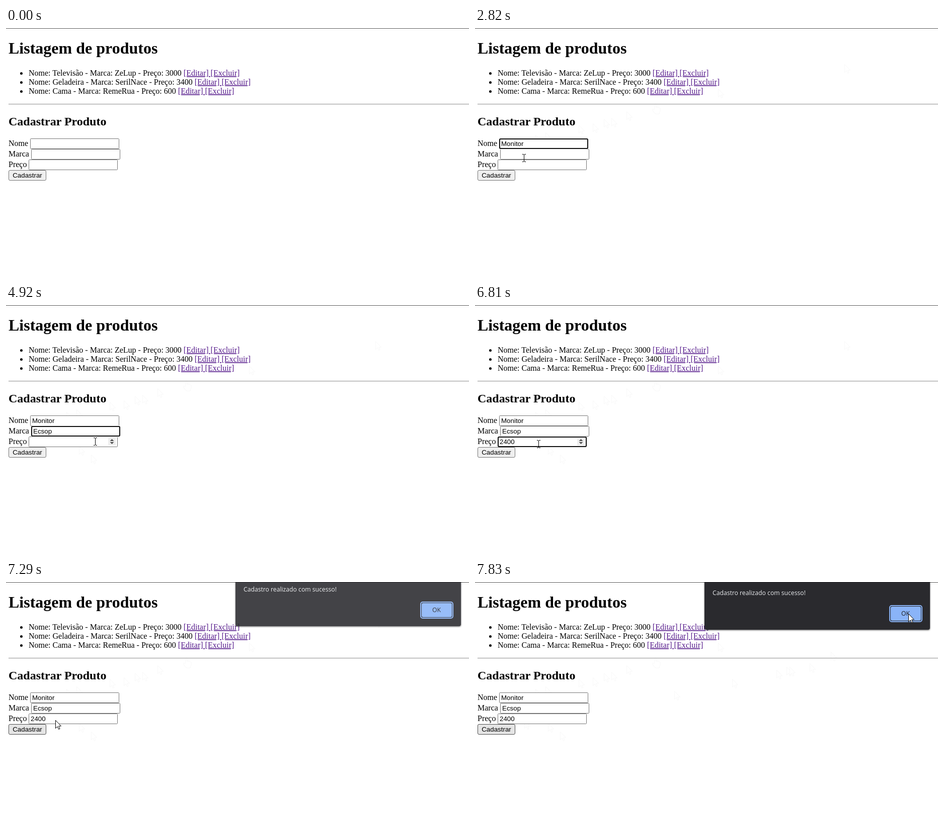
Recreate the animation shown at these times as an HTML page. Size 920 px wide and 496 px high, loop 8000 ms.

```html
<!DOCTYPE html>
<html lang="pt">
<head>
<meta charset="utf-8">
<title>Listagem de produtos</title>
<style>
  html, body { margin: 0; width: 100%; height: 100%; overflow: hidden; background: #fff; }
  svg { display: block; font: 16px "Liberation Serif", serif; }
  .bold { font-weight: bold; }
  .link { fill: #551a8b; text-decoration: underline; }
  .ui { font: 13.333px "Liberation Sans", sans-serif; }
  .dialog { font: 12.2px "Open Sans", sans-serif; }
  .box { fill: #fff; stroke: #767676; }
  .halo { fill: none; stroke: #fff; }
  .ring { fill: none; stroke: #101010; stroke-width: 2; }
  #button rect { fill: #efefef; stroke: #767676; }
  #button.hover rect { fill: #e5e5e5; stroke: #4f4f4f; }
  #trail { opacity: .03; }
</style>
</head>
<body>
<svg width="920" height="496" viewBox="0 0 920 496">
  <defs>
    <path id="arrow" d="M.5 .5V16.5L4.2 13L6.6 18.4L9 17.4L6.7 12H11.5Z" fill="#fff" stroke="#000"/>
    <path id="beam" d="M-3 -7.5H-1L.5 -6.5L2 -7.5H4M.5 -6.5V6.5M-3 7.5H-1L.5 6.5L2 7.5H4" fill="none" stroke="#000"/>
    <path id="hand" d="M5.5 12V2Q7 -.5 8.5 2V8Q10 6 11.5 8Q13 7 14.5 9Q16 8 17 10V15L15 21H7L1 13Q2 10 5.5 13" fill="#fff" stroke="#000"/>
    <filter id="shadow" x="-5%" y="-20%" width="110%" height="150%">
      <feDropShadow dx="0" dy="1" stdDeviation="1.8" flood-opacity=".65"/>
    </filter>
  </defs>
  <rect width="920" height="1" fill="#555"/>
  <g id="trail"></g>
  <text class="bold" x="5" y="51" font-size="32">Listagem de produtos</text>
  <g id="list"></g>
  <rect x="5" y="151" width="915" height="1" fill="#9a9a9a"/>
  <rect x="5" y="152" width="915" height="1" fill="#eee"/>
  <text class="bold" x="5" y="194" font-size="24">Cadastrar Produto</text>
  <g id="form"></g>
  <g id="rings"></g>
  <g id="spinner">
    <rect x="203" y="265" width="15" height="15" fill="#efefef"/>
    <path d="M206.500 271L210.500 267L214.500 271ZM206.500 273L210.500 277L214.500 273Z" fill="#505050"/>
  </g>
  <rect id="caret" width="1" height="15"/>
  <g id="button" class="ui">
    <rect x="5.500" y="283.500" width="74" height="20" rx="2.500"/>
    <text x="42.500" y="298" text-anchor="middle">Cadastrar</text>
  </g>
  <g id="dialog" class="dialog">
    <rect x="456" y="-40" width="448" height="135" rx="4" fill="#292a2d" filter="url(#shadow)"/>
    <text x="472" y="26" fill="#e8eaed">Cadastro realizado com sucesso!</text>
    <rect x="824" y="47" width="64" height="32" rx="4" fill="#292a2d" stroke="#8ab4f8" stroke-width="2"/>
    <rect x="826" y="49" width="60" height="28" rx="3" fill="#8ab4f8"/>
    <text x="855.500" y="67" text-anchor="middle" fill="#202124">OK</text>
  </g>
  <use id="cursor"/>
</svg>
<script>
const LOOP = 8000, TICK = 30;
const $ = id => document.getElementById(id);

function add(parent, tag, attrs, text = '') {
  const node = document.createElementNS('http://www.w3.org/2000/svg', tag);
  for (const name in attrs) node.setAttribute(name, attrs[name]);
  node.textContent = text;
  return parent.appendChild(node);
}
const show = (node, on) => node.setAttribute('visibility', on ? 'visible' : 'hidden');

[['Televisão', 'ZeLup', 3000], ['Geladeira', 'SerilNace', 3400], ['Cama', 'RemeRua', 600]]
  .forEach(([name, brand, price], i) => {
    const y = 95 + 18 * i;
    add($('list'), 'circle', { cx: 30.5, cy: y - 4.5, r: 2.5 });
    const line = add($('list'), 'text', { x: 45, y }, `Nome: ${name} - Marca: ${brand} - Preço: ${price} `);
    add(line, 'tspan', { class: 'link' }, '[Editar] [Excluir]');
  });

const fields = [
  { label: 'Nome', x: 48, y: 220, value: 'Monitor', focus: 600, blur: 2940,
    keys: [1410, 1500, 1590, 1680, 1890, 1980, 2070] },
  { label: 'Marca', x: 50, y: 241, value: 'Ecsop', focus: 2940, blur: 5130,
    keys: [3480, 3870, 4050, 4140, 4230] },
  { label: 'Preço', x: 45, y: 262, value: '2400', focus: 5130, blur: 7080,
    keys: [5640, 5970, 6120, 6210] },
];
for (const f of fields) {
  const form = $('form');
  add(form, 'text', { x: 5, y: f.y + 15 }, f.label);
  add(form, 'rect', { class: 'box', x: f.x + .5, y: f.y + .5, width: 176, height: 20, rx: 1 });
  f.text = add(form, 'text', { class: 'ui', x: f.x + 4, y: f.y + 15 });
  f.ring = add($('rings'), 'g', {});
  add(f.ring, 'rect', { class: 'halo', x: f.x - .5, y: f.y - .5, width: 178, height: 22, rx: 3 });
  add(f.ring, 'rect', { class: 'ring', x: f.x + 1, y: f.y + 1, width: 175, height: 19, rx: 2 });
}

// Pointer path: time, x, y, shape
const path = [
  [60, 734, 72, 'arrow'], [90, 483, 121, 'arrow'], [120, 351, 150, 'hand'], [150, 301, 166, 'arrow'],
  [180, 271, 179, 'arrow'], [210, 256, 181, 'arrow'], [240, 234, 190, 'arrow'], [270, 206, 193, 'arrow'],
  [330, 140, 208, 'arrow'], [360, 120, 213, 'arrow'], [390, 104, 228, 'beam'],
  [2460, 104, 228, 'beam'], [2730, 97, 259, 'beam'], [4650, 97, 259, 'beam'],
  [4710, 145, 281, 'arrow'], [4770, 169, 298, 'arrow'], [4890, 177, 272, 'beam'],
  [6630, 177, 272, 'beam'], [6810, 126, 277, 'beam'], [6960, 62, 291, 'arrow'], [7230, 62, 291, 'arrow'],
  [7290, 98, 275, 'arrow'], [7320, 181, 263, 'arrow'], [7350, 396, 217, 'arrow'], [7380, 511, 193, 'arrow'],
  [7410, 599, 175, 'arrow'], [7470, 619, 169, 'arrow'], [7500, 625, 169, 'arrow'], [7560, 665, 162, 'arrow'],
  [7590, 707, 139, 'arrow'], [7710, 867, 70, 'arrow'], [7830, 861, 63, 'arrow'],
];
const trail = path
  .filter(([, x, , shape]) => shape !== 'beam' && x > 75)
  .map(([time, x, y, shape]) => ({ time, node: add($('trail'), 'use', { href: '#' + shape, x, y }) }));

function drawFields(t) {
  show($('caret'), false);
  for (const f of fields) {
    const typed = f.keys.filter(k => k <= t);
    const active = t >= f.focus && t < f.blur;
    f.text.textContent = f.value.slice(0, typed.length);
    show(f.ring, active);
    if (!active) continue;
    const idle = t - Math.max(f.focus, ...typed);
    $('caret').setAttribute('x', Math.floor(f.x + 4 + f.text.getComputedTextLength()));
    $('caret').setAttribute('y', f.y + 3);
    show($('caret'), idle % 1000 < 500);
  }
}

function drawPointer(t) {
  const i = path.findLastIndex(p => p[0] <= t);
  show($('cursor'), i >= 0);
  trail.forEach(g => show(g.node, t > g.time));
  if (i < 0) return;
  const [t0, x0, y0, shape] = path[i];
  const [t1, x1, y1] = path[i + 1] || [LOOP, x0, y0];
  const p = (t - t0) / (t1 - t0);
  $('cursor').setAttribute('href', '#' + shape);
  $('cursor').setAttribute('x', Math.round(x0 + (x1 - x0) * p));
  $('cursor').setAttribute('y', Math.round(y0 + (y1 - y0) * p));
}

function drawDialog(t) {
  const p = Math.min(1, Math.max(0, (t - 7200) / 180));
  const eased = 1 - (1 - p) ** 2;
  $('dialog').setAttribute('transform', `translate(0 ${-28 * (1 - eased)})`);
  $('dialog').setAttribute('opacity', Math.min(1, 1.17 * eased));
  show($('dialog'), p > 0);
}

function frame() {
  const t = Math.floor(performance.now() % LOOP / TICK) * TICK;
  drawFields(t);
  drawPointer(t);
  drawDialog(t);
  show($('spinner'), t >= 4860 && t < 6870);
  $('button').classList.toggle('hover', t >= 6930);
  requestAnimationFrame(frame);
}
frame();
</script>
</body>
</html>
```
